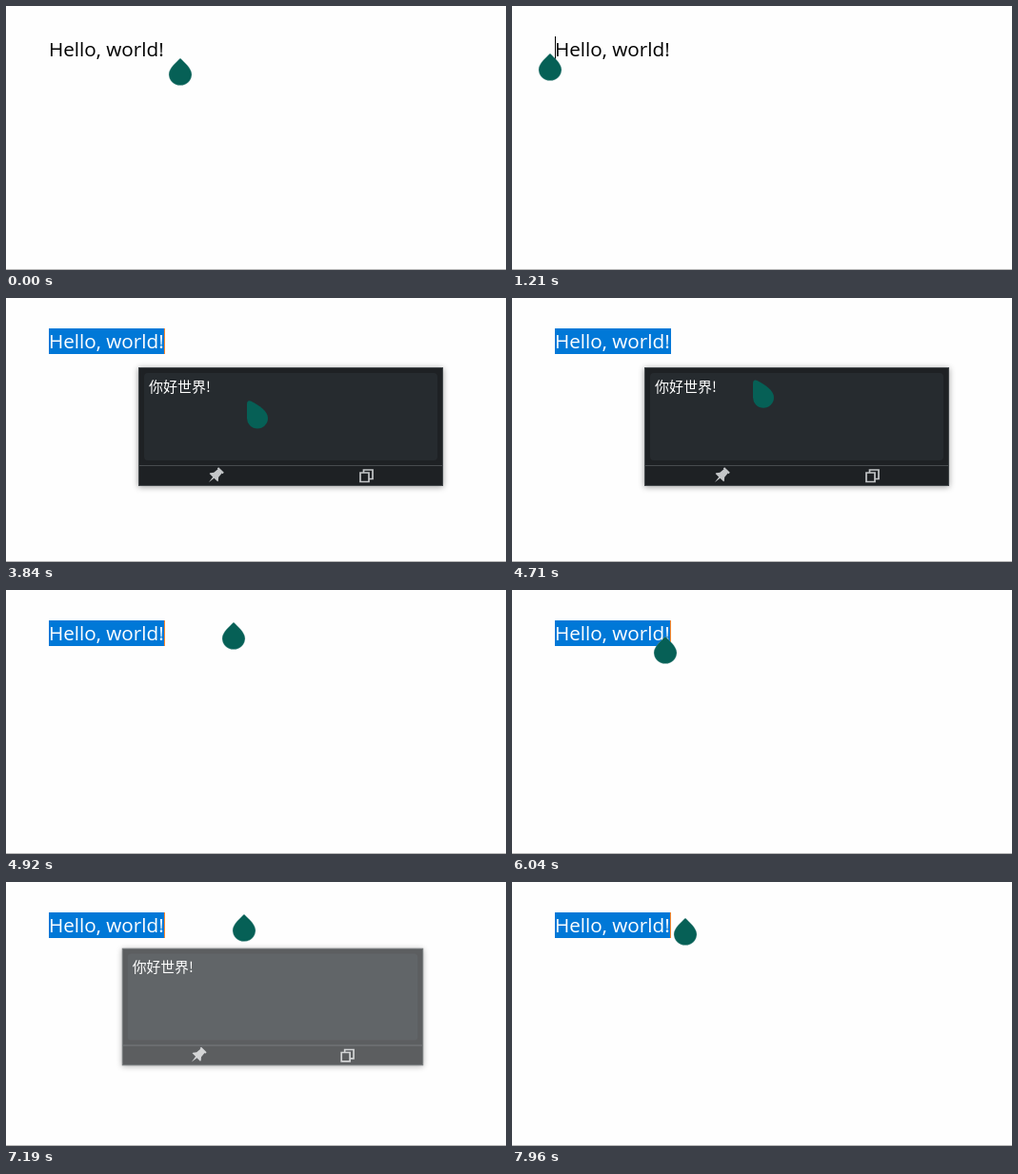
Animation of 525x278 px, one loop 8 s. Source, as an HTML page:

```html
<!DOCTYPE html>
<html lang="zh-CN">
<head>
<meta charset="utf-8">
<title>Select and translate</title>
<style>
  html, body { margin: 0; width: 100%; height: 100%; overflow: hidden; background: #fefefe; }
  svg { display: block; width: 525px; height: 278px; }
  .line { font: 20.7px "Open Sans", "Noto Sans", sans-serif; }
  .result { font: 15px "Noto Sans CJK SC", "Noto Sans CJK", sans-serif; fill: #fff; }
  #card { filter: drop-shadow(0 1px 3px rgba(0, 0, 0, .4)); }
</style>
</head>
<body>
<svg viewBox="0 0 525 278">
  <defs>
    <clipPath id="clip"><rect id="clipBox" x="45" y="32" width="0" height="27"/></clipPath>
  </defs>
  <rect width="525" height="278" fill="#fefefe"/>
  <rect y="277" width="525" height="1" fill="#b9b9b9"/>

  <text id="line" class="line" x="45" y="53">Hello, world!</text>
  <g clip-path="url(#clip)">
    <rect x="45" y="32" width="122" height="27" fill="#0078d7"/>
    <text class="line" x="45" y="53" fill="#fff">Hello, world!</text>
  </g>
  <rect id="caret" y="32" width="1" height="27"/>

  <g id="card">
    <rect x=".5" y=".5" width="319" height="124" fill="#1e2124" stroke="#42474a"/>
    <rect x="6" y="6" width="308" height="92" rx="4" fill="#262b2f"/>
    <rect x="1" y="103" width="318" height="1" fill="#484c4f"/>
    <text id="result" class="result" x="11" y="26">你好世界!</text>
    <path transform="translate(81 114) rotate(45)" fill="#c4c6c8"
      d="M-4-8.5H4V-6.5H3L3.5-1 6 2V3H1L0 10-1 3H-6V2L-3.5-1-3-6.5H-4Z"/>
    <path fill="none" stroke="#c4c6c8" stroke-width="1.7" d="M233 111H242V120.500H233ZM236.500 111V108H246V117.500H242"/>
  </g>

  <g id="pointer" fill="#066056">
    <path id="beam" stroke="#9bb" stroke-width=".5" stroke-opacity=".6"
      d="M0 0C4 4 12 10.500 12 17A12 11.600 0 0 1-12 17C-12 10.500-4 4 0 0Z"/>
    <path id="arrow" d="M-1 4V18.500A11 11 0 0 0 21 18.500C21 11 12 5.500 3 .6Q-1-1-1 4Z"/>
  </g>
</svg>
<script>
  const LOOP = 8000;
  const $ = id => document.getElementById(id);
  const line = $('line'), clipBox = $('clipBox'), caret = $('caret'), card = $('card');

  // Pointer legs: first step, last step, step count, destination
  const legs = [
    [530, 670, 3, 120, 59],
    [740, 950, 4, 43, 50],
    [1210, 1210, 1, 40, 50],
    [1280, 1630, 6, 180, 53],
    [3640, 3840, 4, 254, 108],
    [3910, 4050, 3, 264, 121],
    [4640, 4920, 5, 239, 34],
    [4980, 5410, 7, 183, 42],
    [5480, 5680, 3, 138, 49],
    [5900, 6040, 3, 161, 49],
    [6700, 6910, 4, 225, 95],
    [6980, 7190, 4, 250, 34],
    [7480, 7690, 4, 205, 37],
    [7890, 7960, 2, 182, 38]
  ];

  const caretOn = [[130, 660], [1210, 2180], [2710, 3240], [3780, 4310],
                   [4840, 5370], [5900, 6430], [6970, LOOP]];

  const cards = [
    { x: 139, y: 73, open: 2710, text: 2980, fade: 4780 },
    { x: 120, y: 69, open: 6370, text: 6500, fade: 7190 }
  ];
  const fadeSteps = [[.72, .989], [.32, .96]];
  const STEP = 70;

  const show = (el, on) => el.setAttribute('visibility', on ? 'inherit' : 'hidden');

  function pointerAt(t) {
    let x = 183, y = 55;
    for (const [from, to, n, tx, ty] of legs) {
      if (t < from) break;
      const k = n > 1 ? Math.floor((t - from) / (to - from) * (n - 1) + 1e-6) : 0;
      const p = Math.min(1, (k + 1) / n);
      x += (tx - x) * p;
      y += (ty - y) * p;
    }
    return [x, y];
  }

  // Snap a pointer position to the nearest gap between letters
  function textEdge(x) {
    const last = line.getNumberOfChars();
    let best = 45;
    for (let i = 1; i < last; i++) {
      const edge = line.getStartPositionOfChar(i).x;
      if (Math.abs(edge - x) < Math.abs(best - x)) best = edge;
    }
    return Math.abs(166 - x) < Math.abs(best - x) ? 166 : Math.round(best);
  }

  function drawText(t, x) {
    const selecting = t >= 1210;
    const end = selecting && t < 1630 ? textEdge(x) : 166;
    const width = selecting && end > 45 ? end - 44 : 0;
    clipBox.setAttribute('width', width);
    caret.setAttribute('x', end);
    caret.setAttribute('fill', width ? '#ff8728' : '#000');
    show(caret, caretOn.some(([a, b]) => t >= a && t < b));
  }

  function drawCard(t) {
    const c = cards.find(c => t >= c.open && t < c.fade + STEP * fadeSteps.length);
    show(card, c);
    if (!c) return null;
    const [alpha, scale] = t < c.fade ? [1, 1] : fadeSteps[Math.floor((t - c.fade) / STEP)];
    card.setAttribute('opacity', alpha);
    card.setAttribute('transform',
      `translate(${c.x + 160} ${c.y + 62.5}) scale(${scale}) translate(-160 -62.5)`);
    show($('result'), t >= c.text);
    return t < c.fade ? c : null;
  }

  function draw(t) {
    const [x, y] = pointerAt(t);
    drawText(t, x);
    const c = drawCard(t);
    const over = c && x > c.x && x < c.x + 320 && y > c.y && y < c.y + 125;
    show($('arrow'), over);
    show($('beam'), !over);
    $('pointer').setAttribute('transform', `translate(${x} ${y})`);
  }

  const start = performance.now();
  function tick() {
    draw((performance.now() - start) % LOOP);
    requestAnimationFrame(tick);
  }
  tick();
</script>
</body>
</html>
```
